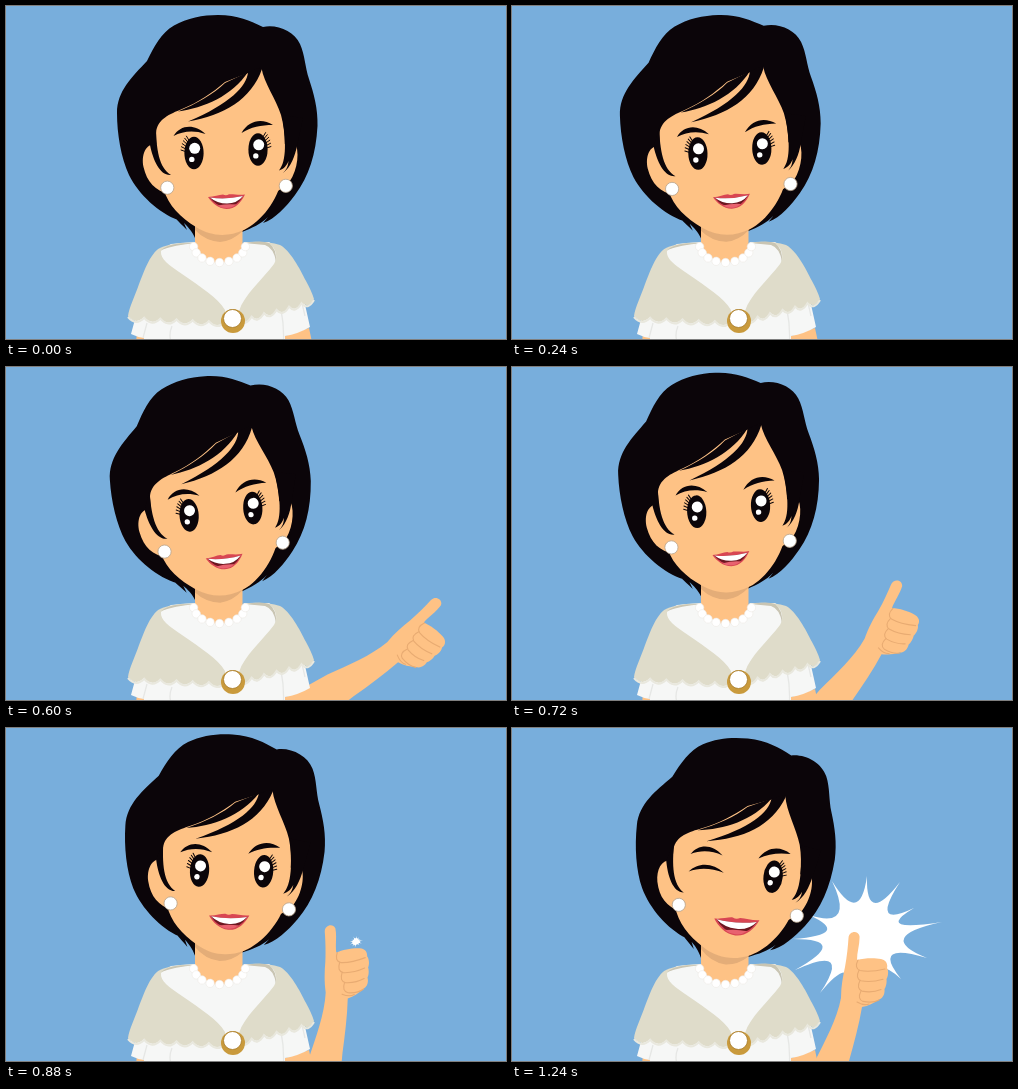
An HTML page that plays this animation: 500x333 px, repeating every 2880 ms.

```html
<!DOCTYPE html>
<html lang="en">
<head>
<meta charset="utf-8">
<title>Thumbs up</title>
<style>
  html, body { margin: 0; width: 100%; height: 100%; overflow: hidden; background: #78aedc; }
  svg { display: block; width: 100vw; height: 100vh; }
  .hair { fill: #0b0509; }
  .skin { fill: #fec285; }
  .white { fill: #fff; }
  .cloth { fill: #f6f7f6; }
  .shawl { fill: #dfdcca; }
  .fold { fill: none; stroke: #e6e7e5; stroke-width: 1.3; }
  .crease { fill: none; stroke: #e8ab72; stroke-width: 1.1; stroke-linecap: round; }
  .lash { stroke: #0b0509; stroke-width: 1; stroke-linecap: round; }
</style>
</head>
<body>
<svg viewBox="0 0 500 333" preserveAspectRatio="none">
  <defs>
    <clipPath id="neckClip"><path d="M189 205H236.500V260H189Z"/></clipPath>
  </defs>
  <rect width="500" height="333" fill="#78aedc"/>

  <path id="burst" class="white"/>

  <g id="arm">
    <path class="skin" d="M270 415L303 333C313 313 325 291 329 270C329 258 331 248 333 239C335 228 336 218 336.500 210C337 203 346 202 347.500 208C348 216 345 224 345 232C352 230 362 229.500 369 231C374 232 376 236 375 240C377 243 376 249 374.500 251C375 255 374 259 372.500 261C373 266 371 270 367 271.500C362 275 356 278 350 279C347 297 342 315 337 333L318 415Z"/>
    <g id="fingers" class="crease"></g>
  </g>

  <g data-head>
    <path class="hair" d="M212 9C232 9 244 15 257 21C271 18 288 25 294 38C299 49 299 61 303 73C308 88 312 103 311.500 120C310 148 303 170 289 189C280 201 269 213 257 217L262 211C255 218 246 222 236 226L189 232C186 225 182 221 178 217L181 224C176 219 173 216 169 212L172 214C153 207 133 189 123 169C115 152 111 128 111 107C111 85 126 71 141 55C148 41 155 27 168 19.500C181 12 197 9 212 9Z"/>
  </g>

  <path class="skin" d="M189 210H236.500V242L243 262H183L189 242Z"/>
  <g clip-path="url(#neckClip)">
    <g data-head><path fill="#e4ad78" d="M184 218Q196 235 214 236Q230 235 243 218Z"/></g>
  </g>

  <!-- torso -->
  <path class="skin" d="M131 327L141 331V336H130ZM276 331L303 322L306 336H276Z"/>
  <path class="cloth" d="M189 236C192 249 204 257 214 257C226 256 235 248 238 236L263 236L282 250L298 294L304 321Q292 328 279 330V336H138V332Q131 331 125 328L131 306L152 246L165 238Z"/>
  <path class="fold" d="M166 320Q163 327 164.500 334M275 304Q278 318 277.500 334M137 332L141 317M296 297L299 310"/>
  <path id="shawlLeft" class="shawl"/>
  <path id="shawlRight" class="shawl"/>
  <path fill="#c9c5b3" d="M155 244Q164 236 190 237Q168 239 155 244ZM238 237Q256 234 263 237Q271 243 270 256Q268 242 259 239Z"/>
  <path id="trim" fill="none" stroke="#e9e8de" stroke-width="2"/>
  <g id="pearls" fill="#fff" stroke="#eceae4" stroke-width=".6"></g>
  <circle cx="227" cy="315" r="12" fill="#c99a3c"/>
  <circle cx="226.500" cy="312.500" r="9" fill="#fff" stroke="#a77b2b" stroke-width=".8"/>

  <!-- face -->
  <g data-head>
    <path class="skin" d="M151 138C140 137 135 148 137.500 161C141 176 149 185 164 188L170 150ZM277 138L290 139C294 150 290 170 280 180L270 186Z"/>
    <path class="skin" d="M255.500 62C258 77 270 93 275 109C280 127 280 150 276 172C272 194 255 216 238 224C222 231 206 231 190 221C175 212 162 199 158 184C153 168 150 145 150 127C151 113 164 108 176 103C193 96 206 87 219 76L242 67Z"/>
    <path class="hair" d="M219 77C208 88 190 98 172 105.500C198 102 226 90 242 66Z"/>
    <path class="hair" d="M256 61L242 66C241 80 224 98 182 115.500C218 109 245 94 256 63Z"/>
    <path class="hair" d="M150 119C150 143 153 162 165 169C154 170 147 154 144 139Z"/>
    <path class="hair" d="M276 109C280 133 281 155 273 164.500C278 163 281 159 282.500 155C282 161 280 164 277 167C285 161 289 150 291 140L297 112Z"/>

    <path class="hair" d="M167.500 130C174 119 188 117 199.500 128C188 124 177 125 167.500 130Z"/>
    <path class="hair" d="M235.500 127C243 114 256 112 267 119C255 119 245 121 235.500 127Z"/>

    <g id="leftEye"></g>
    <path id="wink" class="hair" d="M167.500 147.500C176 137 191 136 202.500 145C190 141.500 178 142 167.500 147.500Z"/>
    <g id="rightEye"></g>

    <g id="mouth">
      <path fill="#d84653" d="M202 191C208 191 213 188.500 217 188.500Q220 190 223 188.300C228 188 233 189.500 239 188.500C235 197 229 203 220.500 203C212 202.500 206 197 202 191Z"/>
      <path fill="#6d1720" d="M204 191.500Q220 194 237 190Q231 201 220.500 201Q210 200.500 204 191.500Z"/>
      <path class="white" d="M204 191.500Q220 194 237 190Q231 197.500 221 197.500Q211 197.500 204 191.500Z"/>
      <path fill="#e8626f" d="M212 199.500Q221 197.500 230 198.500Q226 202 220.500 202Q215 202 212 199.500Z"/>
    </g>

    <g stroke="#b9a48c" stroke-width=".8">
      <circle class="white" cx="161.300" cy="181.700" r="6.600"/>
      <circle class="white" cx="279.800" cy="179.800" r="6.600"/>
    </g>
  </g>
</svg>
<script>
const LOOP = 2880, STEP = 40;
const get = id => document.getElementById(id);
const heads = document.querySelectorAll('[data-head]');
const arm = get('arm'), burst = get('burst'), mouth = get('mouth');

const part = (t, from, to) => Math.min(1, Math.max(0, (t - from) / (to - from)));
const mix = (a, b, k) => a + (b - a) * k;
const sway = k => (1 - Math.cos(Math.PI * k)) / 2;
const repeat = (n, f) => Array.from({ length: n }, (_, i) => f(i)).join('');

// A row of n scallops along a line
function hem(x0, y0, x1, y1, n) {
  const dx = (x1 - x0) / n, dy = (y1 - y0) / n;
  return repeat(n, () => `q${dx / 2} ${dy / 2 + 9} ${dx} ${dy}`);
}

function drawShawl() {
  const left = hem(122, 310, 219, 315, 6), right = hem(308, 293, 233, 313, 6);
  get('shawlLeft').setAttribute('d', 'M190 236.5C176 236 162 238 154 242C144 247 137 268 132 281C128 292 123 302 122 310'
    + left + 'V304C212 292 196 282 176 268C163 259 154 253 155 245Q162 239 187 237Z');
  get('shawlRight').setAttribute('d', 'M237 236.5C250 235 264 236 274 239C284 244 294 263 300 275Q306 286 308 293'
    + right + 'V305C238 289 256 274 268 258C272 252 271 242 262 237Z');
  get('trim').setAttribute('d', `M122 311${left}M308 294${right}`);
}

function drawPearls() {
  get('pearls').innerHTML = repeat(9, i => {
    const a = Math.PI * (0.97 - 0.1175 * i);
    return `<circle cx="${213.5 + 26 * Math.cos(a)}" cy="${239 + 17.5 * Math.sin(a)}" r="4.2"/>`;
  });
}

// side: -1 puts the lashes on the left, 1 on the right
function drawEye(id, x, y, side) {
  const lashes = repeat(6, i => {
    const a = 0.1 + 0.17 * i, c = side * Math.cos(a), s = -Math.sin(a);
    return `<path class="lash" d="M${x + 9 * c} ${y + 16 * s}l${4 * c} ${3.5 * s - 1}"/>`;
  });
  get(id).innerHTML = `<ellipse class="hair" cx="${x}" cy="${y}" rx="9.6" ry="16.3"/>${lashes}
    <circle class="white" cx="${x + 0.7}" cy="${y - 4.7}" r="5.5"/>
    <circle class="white" cx="${x - 2.2}" cy="${y + 6.4}" r="2.7"/>`;
}

function drawFingers() {
  get('fingers').innerHTML = repeat(4, i =>
    `<path d="M${346 + i} ${232 + 10.3 * i}q-4 8 2 10.500q10 2 ${25 - 3 * i} -1.500"/>`)
    + '<path d="M345 274Q352 278 357 276"/>';
}

function drawBurst() {
  const tips = [[5, -60], [38, -54], [52, -28], [80, -14], [65, 22], [39, 43],
    [-12, 70], [-42, 57], [-67, 34], [-69, 3], [-53, -21], [-30, -55]];
  burst.setAttribute('d', `M${tips[0]}` + repeat(tips.length, i => {
    const a = tips[i], b = tips[(i + 1) % tips.length];
    return `Q${(a[0] + b[0]) * 0.08} ${(a[1] + b[1]) * 0.08} ${b}`;
  }) + 'Z');
}

function draw(t) {
  // head leans slowly one way, then hops over to the other
  const over = sway(part(t, 640, 1000));
  const tilt = mix(-3.4 * part(t, 0, 560), 6.2, over);
  const hop = -4 * Math.sin(Math.PI * part(t, 600, 1000));
  heads.forEach(h => h.setAttribute('transform', `translate(0 ${hop}) rotate(${tilt} 209 230)`));

  const winking = t >= 960;
  get('leftEye').style.display = winking ? 'none' : '';
  get('wink').style.display = winking ? '' : 'none';
  const smile = 1 + 0.22 * part(t, 800, 1000);
  mouth.setAttribute('transform', `translate(220 189) scale(${smile}) translate(-220 -189)`);

  // arm swings in past its rest place, then settles
  const enter = part(t, 600, 880), rest = 1 - part(t, 880, 1000);
  const turn = mix(39, -8, enter) * rest;
  const x = mix(63, -13, enter) * rest, y = mix(25, -8.5, enter) * rest;
  arm.style.display = t < 600 ? 'none' : '';
  arm.setAttribute('transform', `translate(${x} ${y}) rotate(${turn} 352 245)`);

  // burst grows steadily, overshoots and eases back
  const size = Math.max(0, Math.min((t - 867) / 146, 1 + 0.38 * (1 - part(t, 1080, 1240)) ** 3));
  burst.style.display = size ? '' : 'none';
  burst.setAttribute('transform', `translate(350 ${214 - 6 * Math.min(size, 1)}) scale(${size})`);
}

drawShawl();
drawPearls();
drawEye('leftEye', 188, 147, -1);
drawEye('rightEye', 252, 143.5, 1);
drawFingers();
drawBurst();

const start = performance.now();
function tick() {
  const t = (performance.now() - start) % LOOP;
  draw(Math.floor(t / STEP) * STEP);
  requestAnimationFrame(tick);
}
draw(0);
requestAnimationFrame(tick);
</script>
</body>
</html>
```
